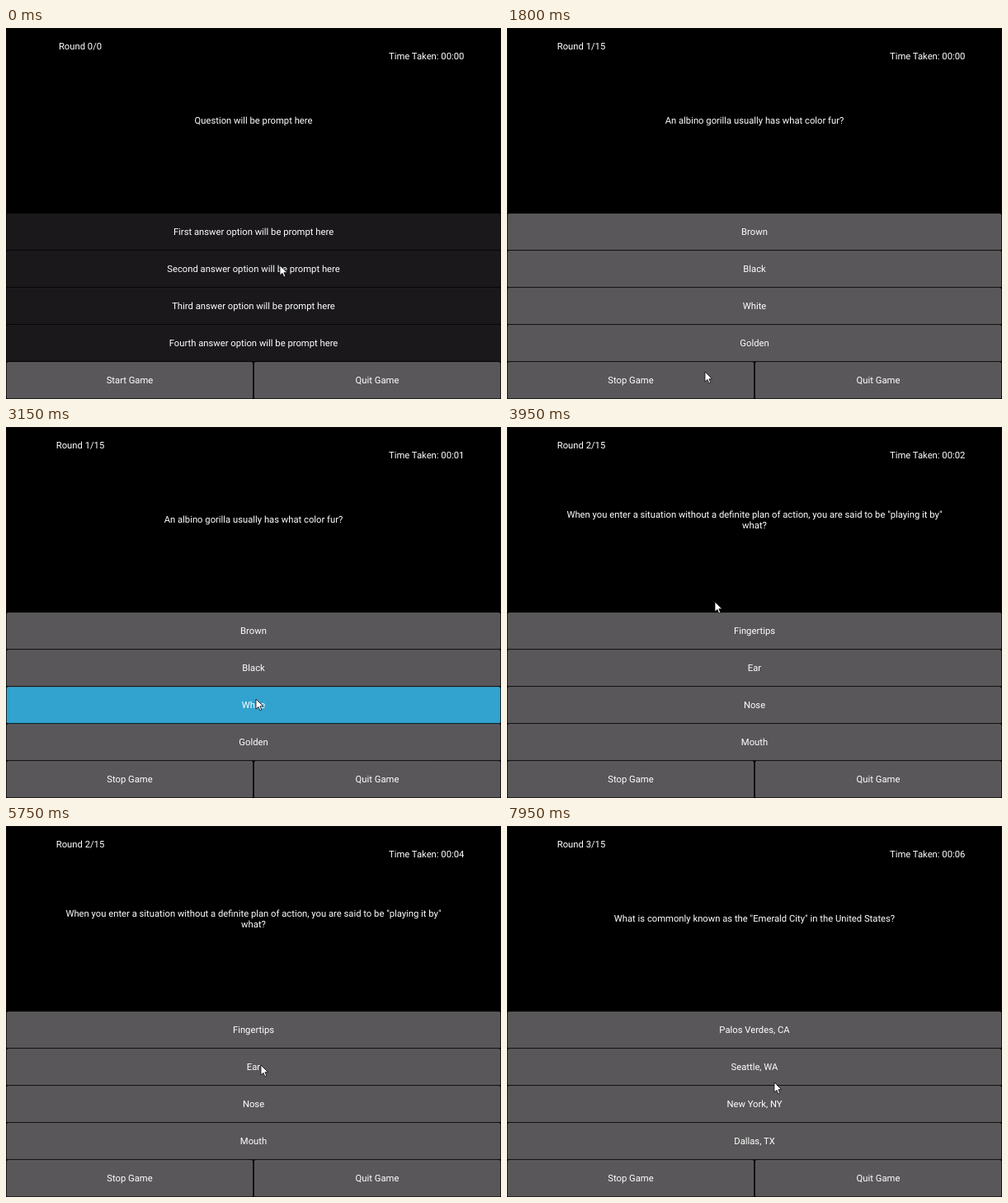
Write an HTML page that moves like this. It is 600 by 450 pixels and loops after 8 s.

```html
<!DOCTYPE html>
<html lang="en">
<head>
<meta charset="utf-8">
<title>Quiz game</title>
<style>
  html, body { margin: 0; width: 100%; height: 100%; overflow: hidden; background: #000; }
  svg { display: block; width: 600px; height: 450px; }
  text {
    font: 11.25px Roboto, sans-serif;
    fill: #fff;
    text-anchor: middle;
    text-rendering: geometricPrecision;
    white-space: pre;
  }
</style>
</head>
<body>
<svg id="stage" viewBox="0 0 600 450"></svg>
<script>
const LOOP = 8000, STEP = 50;
const LINE = 13.2, BASELINE = 3.85;

const SKINS = {
  normal:   { face: '#595759', edge: '#6b696b' },
  disabled: { face: '#1a181b', edge: '#242225' },
  pressed:  { face: '#32a2cf', edge: '#4bafd6' }
};

const SCENES = [
  { at: 0, round: '0/0', question: ['Question will be prompt here'],
    answers: ['First', 'Second', 'Third', 'Fourth'].map(n => n + ' answer option will be prompt here') },
  { at: 1800, round: '1/15', question: ['An albino gorilla usually has what color fur?'],
    answers: ['Brown', 'Black', 'White', 'Golden'] },
  { at: 3350, round: '2/15',
    question: ['When you enter a situation without a definite plan of action, you are said to be "playing it by"', 'what?'],
    answers: ['Fingertips', 'Ear', 'Nose', 'Mouth'] },
  { at: 6950, round: '3/15', question: ['What is commonly known as the "Emerald City" in the United States?'],
    answers: ['Palos Verdes, CA', 'Seattle, WA', 'New York, NY', 'Dallas, TX'] }
];

// Button index (0-3 answers, 4 start/stop) and when it is held down
const PRESSES = [
  { button: 4, from: 1550, to: 1800 },
  { button: 2, from: 3100, to: 3350 },
  { button: 1, from: 6700, to: 6950 }
];

// Pointer tip: time, x, y
const POINTER = [
  [0, 332, 288], [350, 230, 398], [600, 230, 398], [650, 227, 400],
  [1200, 227, 400], [1300, 240, 417], [2150, 240, 417], [2350, 220, 385],
  [2550, 242, 350], [2850, 303, 330], [3700, 303, 330], [3950, 252, 212],
  [4350, 300, 160], [4500, 300, 160], [5150, 309, 290], [7500, 309, 290],
  [7700, 288, 265], [7950, 324, 311]
];

const stage = document.getElementById('stage');

function add(tag, attrs, parent = stage) {
  const el = document.createElementNS('http://www.w3.org/2000/svg', tag);
  for (const key in attrs) el.setAttribute(key, attrs[key]);
  return parent.appendChild(el);
}

function setText(el, value) {
  if (el.textContent !== value) el.textContent = value;
}

const label = (x, centerY) => add('text', { x, y: centerY + BASELINE });

function makeButton(x, y, width) {
  const face = add('rect', { x: x + 0.8, y: y + 0.4, width: width - 1.6, height: 43.8, rx: 1.3 });
  const edge = add('rect', { x: x + 2, y: y + 0.4, width: width - 4, height: 0.8 });
  const text = label(x + width / 2, y + 22.5);
  return (value, skin) => {
    setText(text, value);
    face.setAttribute('fill', SKINS[skin].face);
    edge.setAttribute('fill', SKINS[skin].edge);
  };
}

add('rect', { width: 600, height: 450, fill: '#000' });
add('rect', { x: 0.5, y: 0.5, width: 599, height: 449, fill: 'none', stroke: '#0d0d0d' });

const roundLabel = label(90, 22.5);
const timeLabel = label(509.7, 33.75);
const questionLabels = [label(300, 112.5), label(300, 112.5)];
const buttons = [225, 270, 315, 360].map(y => makeButton(0, y, 600));
buttons.push(makeButton(0, 405, 300), makeButton(300, 405, 300));
const pointer = add('path', {
  d: 'M0 0V12L3 9.4L4.9 13.9L6.8 13.1L4.9 8.7H8.7Z',
  fill: '#fff', stroke: '#000', 'stroke-width': 0.75
});

// Smooth curve through the keys that rests at turning points
function slope(i, axis) {
  const a = POINTER[i - 1], b = POINTER[i], c = POINTER[i + 1];
  if (!a || !c || (b[axis] - a[axis]) * (c[axis] - b[axis]) <= 0) return 0;
  return (c[axis] - a[axis]) / (c[0] - a[0]);
}

function pointerAt(t, axis) {
  const last = POINTER.length - 1;
  const next = POINTER.findIndex(key => key[0] > t);
  if (next < 0) return POINTER[last][axis];
  const a = POINTER[next - 1], b = POINTER[next];
  const span = b[0] - a[0], u = (t - a[0]) / span;
  const blend = u * u * (3 - 2 * u);
  return a[axis] + (b[axis] - a[axis]) * blend
    + span * u * (1 - u) * ((1 - u) * slope(next - 1, axis) - u * slope(next, axis));
}

function render(t) {
  const scene = SCENES.filter(s => s.at <= t).pop();
  const playing = scene.at > 0;
  const press = PRESSES.find(p => t >= p.from && t < p.to);
  const skin = (i, idle) => press && press.button === i ? 'pressed' : idle;
  const seconds = Math.max(0, Math.floor((t - 1750) / 1000));

  setText(roundLabel, 'Round ' + scene.round);
  setText(timeLabel, 'Time Taken: 00:' + String(seconds).padStart(2, '0'));

  const lines = scene.question;
  questionLabels.forEach((el, i) => {
    setText(el, lines[i] || '');
    el.setAttribute('y', 112.5 + BASELINE + (i - (lines.length - 1) / 2) * LINE);
  });

  scene.answers.forEach((answer, i) => buttons[i](answer, skin(i, playing ? 'normal' : 'disabled')));
  buttons[4](playing ? 'Stop Game' : 'Start Game', skin(4, 'normal'));
  buttons[5]('Quit Game', 'normal');

  const [x, y] = [1, 2].map(axis => Math.round(pointerAt(t, axis)));
  pointer.setAttribute('transform', `translate(${x} ${y})`);
}

const start = performance.now();
function tick() {
  const elapsed = (performance.now() - start) % LOOP;
  render(Math.floor(elapsed / STEP) * STEP);
  requestAnimationFrame(tick);
}
tick();
</script>
</body>
</html>
```
